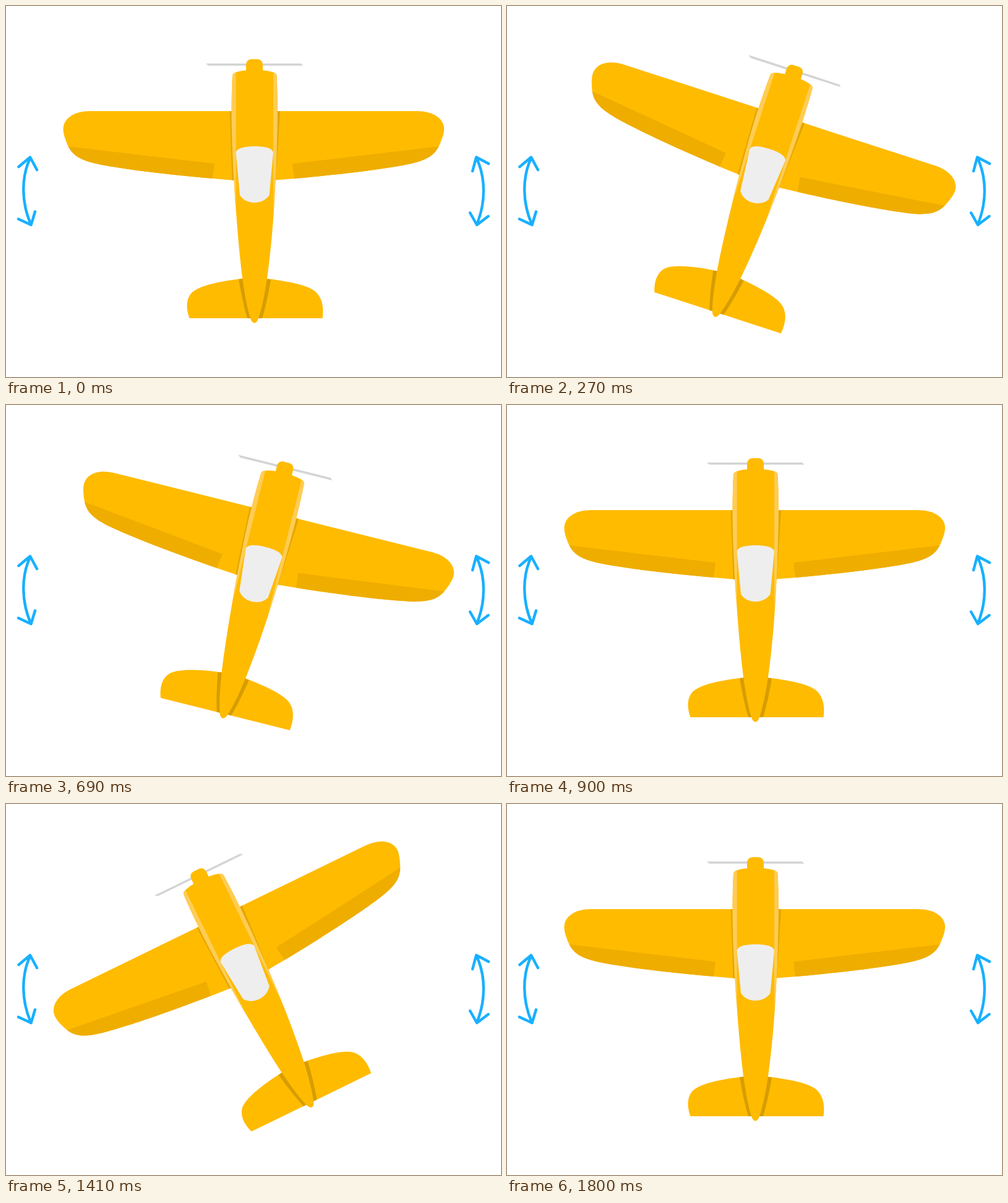
An HTML page that plays this animation: 800x600 px, repeating every 2870 ms.

```html
<!DOCTYPE html>
<html lang="en">
<head>
<meta charset="utf-8">
<title>Plane yaw</title>
<style>
  html, body { margin: 0; width: 100%; height: 100%; overflow: hidden; background: #fff; }
  svg { display: block; width: 100%; height: 100%; }
  .arrows { fill: none; stroke: #18b0ff; stroke-width: 4.4; stroke-linecap: round; stroke-linejoin: round; }
  .body { fill: #fb0; }
  .flap { fill: #efad00; }
  .shade { fill: #d69d00; }
  .root { fill: #e3a600; }
  .light { fill: #ffcc55; }
  .glass { fill: #eee; }
  .prop { fill: #d4d4d4; }
</style>
</head>
<body>
<svg viewBox="0 0 800 600">
  <g class="arrows">
    <path d="M39 246C24 278 25 318 40 353M20.500 260L39 244.500L50 265M20 344.500L40.500 354L47 332.500"/>
    <path d="M760.500 246C775.500 278 775.500 318 761 353M754 267L760 244.500L780 255M750 334.500L761 354L779.500 340"/>
  </g>
  <g id="plane">
    <path class="prop" d="M323 93H477L480.500 96.500H327Z"/>
    <!-- wings -->
    <path class="body" d="M135 170H665C690 170 708 182 708 199C708 207 704 217 699.500 227C692 241 682 249 650 256C600 266 500 277 430 282H370C300 277 200 266 150 256C118 249 108 241 100.500 227C96 217 92.500 207 92.500 199C92.500 182 110 170 135 170Z"/>
    <path class="flap" d="M100.500 227L337 255L334 279C270 273.500 195 265 150 256C118 249 108 241 100.500 227Z"/>
    <path class="flap" d="M699.500 227L463 255L466 279C530 273.500 605 265 650 256C682 249 692 241 699.500 227Z"/>
    <path class="root" d="M361.500 170H368L371 282H365.500Z"/>
    <path class="root" d="M443 170H436L432 282H436Z"/>
    <!-- tail -->
    <path class="body" d="M296.500 505C290.500 489 290.500 472 302 462C315 452 345 445 382 441H422C455 445 486 451 499 461C511 471 514 487 511.500 505Z"/>
    <path class="shade" d="M376 442L384 440.500L397 505H390C384 485 380 465 376 442Z"/>
    <path class="shade" d="M428 442.500L420 441L407 505H414C420 485 424 465 428 442.500Z"/>
    <!-- fuselage -->
    <path id="hull" class="body" d="M366 112C367 106 385 103.500 401.500 103.500C418 103.500 437 106 437.500 112C439.500 150 439 190 437.500 235C435 310 431 375 422 440C418 468 413 490 408 505C405 515 398 515 395 505C390 490 386 468 382 440C374 375 370 310 366 235C364 190 364 150 366 112Z"/>
    <path class="light" d="M371.700 107Q366.500 109 366 112C364 150 364 190 366 235C367.500 270 369 302 371.700 332Z"/>
    <path class="light" d="M432 107Q437 109 437.500 112C439.500 150 439 190 437.500 235C436.500 272 434.500 304 432 335Z"/>
    <path class="body" d="M388 106V96C388 89 392 86 397.500 86H405.500C411 86 415 89 415 96V106Z"/>
    <path class="glass" d="M371.500 237C373 229 388 227 402 227C416 227 430 229 432 237L425.500 306C420 314 411 318 401.500 318C392 318 383 314 378 306Z"/>
  </g>
</svg>
<script>
  const LOOP = 2870, SWING = 1800, STEP = 30, MAX = 30;
  const plane = document.getElementById("plane");

  // Triangle wave: 0, +MAX, 0, -MAX, 0, then rest.
  function angleAt(ms) {
    const t = Math.min(Math.floor(ms / STEP) * STEP, SWING);
    const q = t / (SWING / 4);
    return MAX * (q < 1 ? q : q < 3 ? 2 - q : q - 4);
  }

  const start = performance.now();
  function draw(now) {
    const ms = Math.max(0, now - start) % LOOP;
    plane.setAttribute("transform", `rotate(${angleAt(ms)} 400 300)`);
    requestAnimationFrame(draw);
  }
  draw(start);
</script>
</body>
</html>
```
